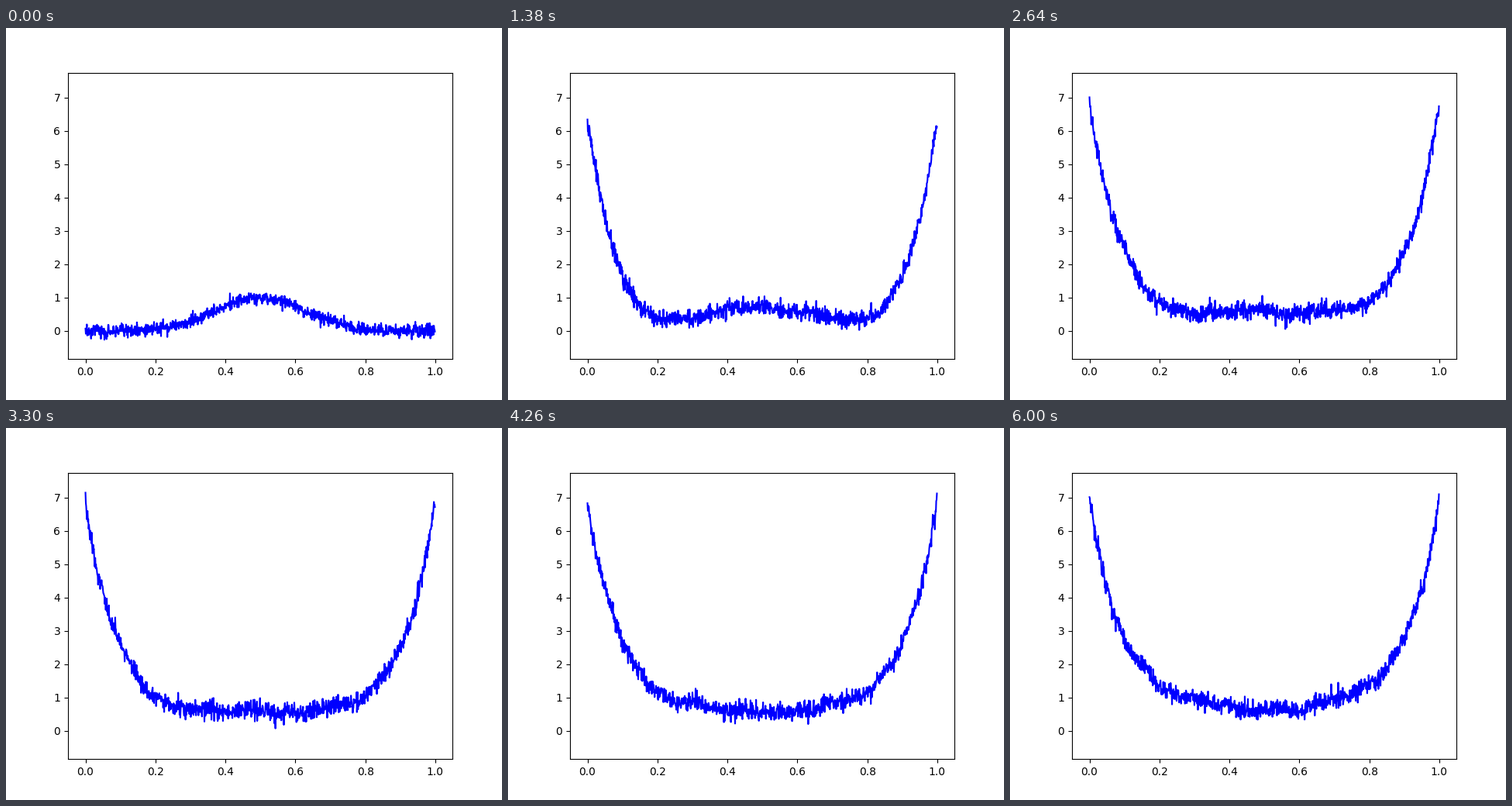
Recreate the animation shown at these times as a matplotlib script. Size 640 by 480 pixels, loop 6060 ms.

```python
import numpy as np
import matplotlib.pyplot as plt
from matplotlib.animation import FuncAnimation

FRAMES = 101
INTERVAL = 60

x = np.arange(1000) / 1000
modes = np.array([3, 5, 8, 13])
phases, drifts = np.random.default_rng(4).uniform(-1, 1, (2, modes.size))


def bump(n):
    """Gaussian that spreads and sinks by diffusion."""
    s = 1 + n / 25
    return np.exp(-30 / s * (x - 0.5) ** 2) / np.sqrt(s)


def layer(d, n):
    """Boundary layer at distance d: saturating height, widening front."""
    height = 6.95 * (1 - np.exp(-n / 9.6))
    front = 0.1 * (max(n, 0.1) / 13) ** 0.69
    return height * np.exp(-(d / front) ** 2) / (1 + d / 0.172) ** 2


def ripple(n):
    """Slow smooth wandering that builds up with time."""
    angle = 2 * np.pi * (np.outer(x, modes) + phases + drifts * n / 60)
    return 0.04 * min(n / 40, 1) * np.sin(angle).sum(axis=1)


def signal(n):
    rng = np.random.default_rng(500 + n)
    sd = 0.1 + 0.04 * min(n / 10, 1)
    noise = rng.normal(0, sd, x.size)
    return bump(n) + layer(x, n) + layer(1 - x, n) + ripple(n) + noise


fig, ax = plt.subplots(figsize=(6.4, 4.8), dpi=100)
ax.set_xlim(-0.04995, 1.04895)
ax.set_ylim(-0.845, 7.75)
line, = ax.plot(x, signal(0), color="blue", lw=1.5)


def update(n):
    line.set_ydata(signal(n))
    return line,


anim = FuncAnimation(fig, update, frames=FRAMES, interval=INTERVAL,
                     init_func=lambda: update(0), repeat=True,
                     repeat_delay=0, blit=False)
plt.show()
```
